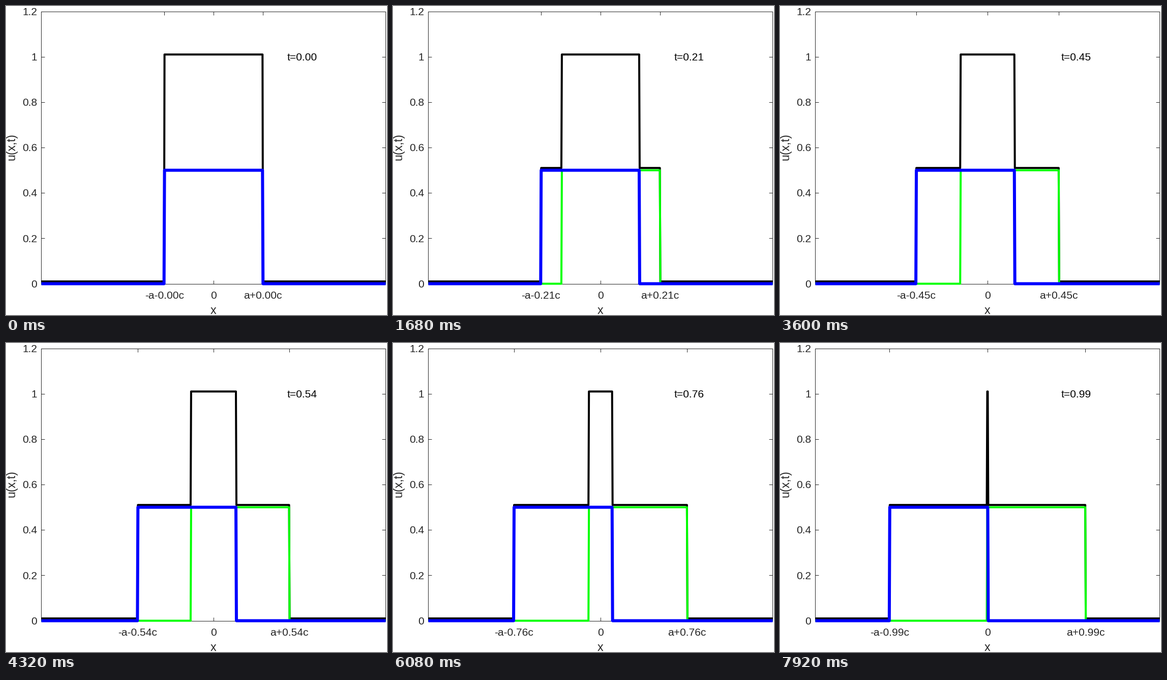
Recreate the animation shown at these times as a matplotlib script. Size 749 by 607 pixels, loop 8 s.

```python
import numpy as np
import matplotlib.pyplot as plt
from matplotlib.animation import FuncAnimation

W, H, DPI = 749, 607, 96
PX = 72 / DPI
LEFT, RIGHT, TOP, BOTTOM = 69.45, 746.45, 10.55, 545.55
XLIM, YMAX, A = 3.5, 1.2, 1.0
GREY = (0.15, 0.15, 0.15)
FRAMES, INTERVAL = 100, 80

plt.rcParams["font.family"] = "Liberation Sans"

fig = plt.figure(figsize=(W / DPI, H / DPI), dpi=DPI, facecolor="white")
ax = fig.add_axes([LEFT / W, 1 - BOTTOM / H, (RIGHT - LEFT) / W, (BOTTOM - TOP) / H])
ax.set_xlim(-XLIM, XLIM)
ax.set_ylim(0, YMAX)
ax.set_axisbelow(True)
ax.set_yticks(np.arange(7) * 0.2)
ax.tick_params(direction="in", length=6.8 * PX, width=PX, color=GREY, top=True,
               right=True, labelbottom=False, labelleft=False)
for spine in ax.spines.values():
    spine.set(linewidth=PX, edgecolor=GREY)


def to_px(x):
    """Horizontal pixel position of a data value."""
    return LEFT + (x + XLIM) / (2 * XLIM) * (RIGHT - LEFT)


def label(x, y, text, size=21, color=GREY, ha="center", **kw):
    """Text with its baseline at pixel (x, y), measured from the top left."""
    return fig.text(x / W, 1 - y / H, text, fontsize=size * PX, color=color,
                    ha=ha, va="baseline", **kw)


def curve(color, width):
    return ax.plot([], [], color=color, lw=width * PX, zorder=3, clip_on=False,
                   solid_joinstyle="round", solid_capstyle="butt")[0]


for i in range(7):
    y = BOTTOM - i * 0.2 / YMAX * (BOTTOM - TOP)
    label(61, y + 7.2, f"{i * 0.2:.1f}".replace(".0", ""), ha="right")

label(to_px(0), 574.9, "0")
label(to_px(0), 604.9, "x", size=23.3)
label(18, 277, "u(x,t)", size=23.3, rotation=90, rotation_mode="anchor")
clock = label(to_px(1.5), 107.2, "", color="black", ha="left")
left_label = label(0, 574.9, "")
right_label = label(0, 574.9, "")

total = curve("black", 4)
right_wave = curve("lime", 4)
left_wave = curve("blue", 6)

x = np.linspace(-5, 5, 1000)
x_shown = np.clip(x, -XLIM, XLIM)


def half_box(s):
    return np.where(np.abs(s) <= A, 0.5, 0.0)


def update(frame):
    t = frame / 100
    going_right, going_left = half_box(x - t), half_box(x + t)
    total.set_data(x_shown, going_right + going_left + 0.01)
    right_wave.set_data(x_shown, going_right)
    left_wave.set_data(x_shown, going_left)

    edge = A + t
    ax.set_xticks([-edge, 0, edge])
    left_label.set(x=to_px(-edge) / W, text=f"-a-{t:.2f}c")
    right_label.set(x=to_px(edge) / W, text=f"a+{t:.2f}c")
    clock.set_text(f"t={t:.2f}")
    return total, right_wave, left_wave, left_label, right_label, clock


anim = FuncAnimation(fig, update, frames=FRAMES, interval=INTERVAL,
                     repeat=True, repeat_delay=0, blit=False)
plt.show()
```
